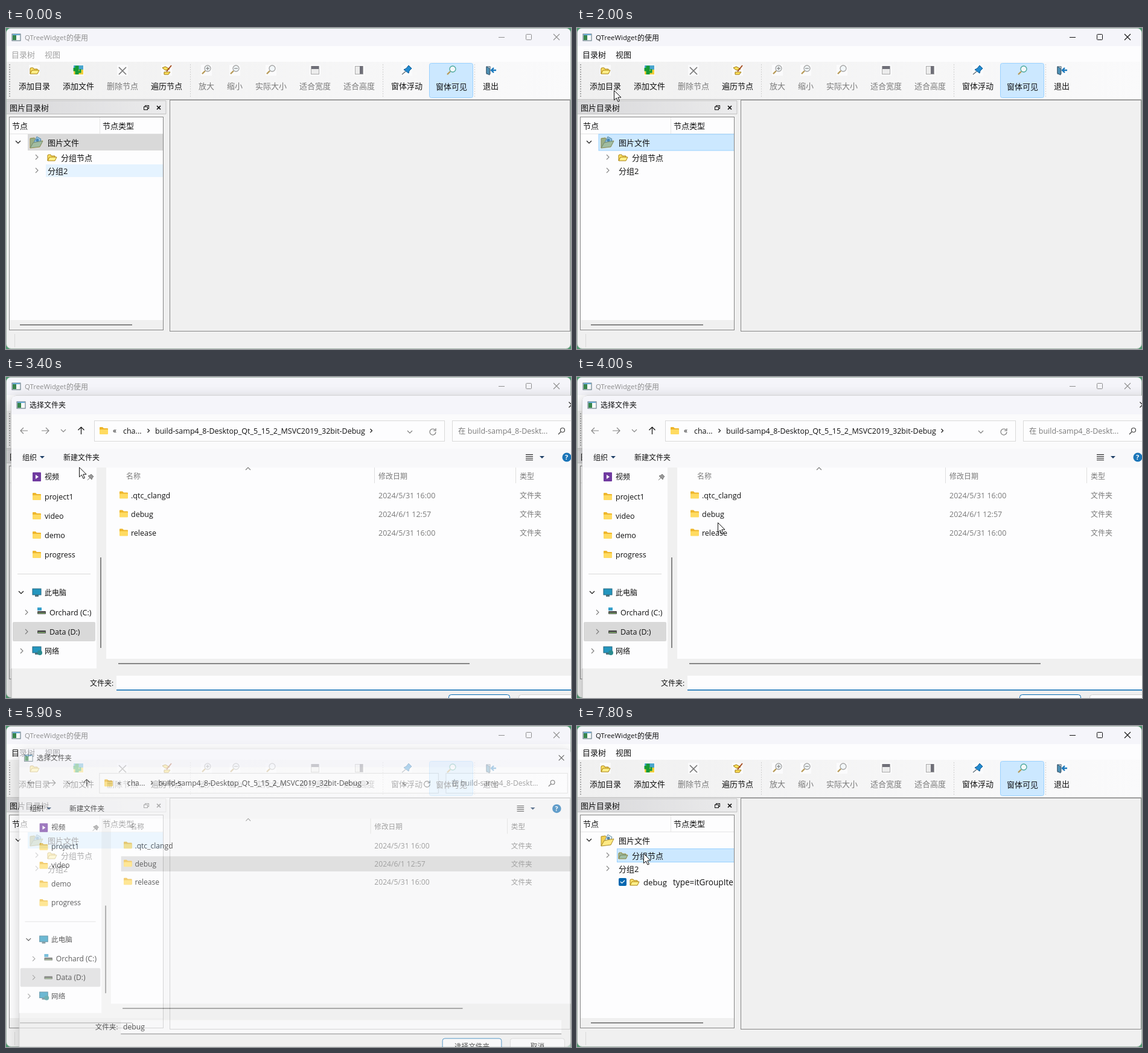
Write an HTML page that moves like this. It is 936 px wide and 532 px high and loops after 8000 ms.

```html
<!DOCTYPE html>
<html lang="zh">
<head>
<meta charset="utf-8">
<style>
html, body { margin: 0; width: 936px; height: 532px; overflow: hidden; background: #4f9a70; }
svg { display: block; font-family: "Open Sans", "Noto Sans CJK SC", "Noto Sans CJK", sans-serif; }
text { white-space: pre; }
</style>
</head>
<body>
<svg id="stage" width="936" height="532" viewBox="0 0 936 532"></svg>
<script>
const PAPER = '#f0f0f0', WHITE = '#fdfdfe', GREY = '#d9d9d9', BLUE = '#cce8ff', HOVER = '#e5f3ff', RIM = '#99d1ff';
const LINE = '#868686', DIM = '#7a7a7a', INK = '#111', ACCENT = '#0067b0';

const R = (x, y, w, h, fill, more = '') => `<rect x="${x}" y="${y}" width="${w}" height="${h}" fill="${fill}" ${more}/>`;
const P = (d, stroke = INK, w = 1, fill = 'none', more = '') => `<path d="${d}" stroke="${stroke}" stroke-width="${w}" fill="${fill}" ${more}/>`;
const C = (x, y, r, fill, stroke = 'none', w = 1) => `<circle cx="${x}" cy="${y}" r="${r}" fill="${fill}" stroke="${stroke}" stroke-width="${w}"/>`;
// Text centred vertically on y
const T = (x, y, s, fill = INK, size = 13, more = '') =>
  `<text x="${x}" y="${y + size * .38}" font-size="${size}" fill="${fill}" ${more}>${s}</text>`;
const D = (x, y, s, fill) => T(x, y, s, fill, /[a-z0-9]/i.test(s) ? 12.5 : 12);
const G = (id, body, more = '') => `<g id="${id}" ${more}>${body}</g>`;
const at = (x, y, body) => `<g transform="translate(${x} ${y})">${body}</g>`;
const line = s => `stroke="${s}"`;

const chevron = (x, y, dir, c = INK, r = 4) => at(x, y, P(
  dir == 'right' ? `M${-r / 2} ${-r}L${r / 2} 0L${-r / 2} ${r}` :
  dir == 'up' ? `M${-r} 2L0 -2L${r} 2` : `M${-r} -2L0 2L${r} -2`, c, 1.1));
const cross = (x, y, r, c = INK, w = 1.1) => P(`M${x - r} ${y - r}l${2 * r} ${2 * r}m0 ${-2 * r}l${-2 * r} ${2 * r}`, c, w);
const appIcon = (x, y) => R(x, y, 14, 11, '#f7f9f9', line('#536c79')) + R(x + 1, y + 2, 6, 8, '#37854d') + R(x + 1, y, 12, 2, '#69a9d4');

// Open folder used by the main window
const FLAT = 'M-7 5V-4L-6 -5H-2L-1 -3H5V-1H8L5 5Z';
const openFolder = (x, y) => at(x, y,
  P('M-7 5V-4L-6 -5H-2L-1 -3H5V-1', '#a87f08', 1, '#ffe36a') +
  P('M-7 5L-4 -1H8L5 5Z', '#a87f08', 1, '#fff08a'));
const folder = (x, y) => at(x, y,
  P('M-7 5V-5Q-7 -6 -6 -6H-2L0 -4H6Q7 -4 7 -3V5Z', 'none', 0, '#eeb62c') + R(-7, -2, 14, 8, '#ffdb61', 'rx="1"'));
const lens = (x, y, rim, mark = '') => at(x, y,
  P('M-2 2L-7 7', '#b79a57', 2.4) + C(2, -2, 5, '#f2f7f9', rim, 1.3) + P(mark, '#6f6f6f'));
const BIG = 'M-10 9V-7L-3 -8L-1 -5L1 -10L7 -7L8 -4L11 -2L6 7Z';
const bigFolder = at(50, 190,
  P('M-10 9V-7L-3 -8L-1 -5H7V0', '#a98b27', 1, '#f3d052') + P('M-4 0L1 -10L8 -6L5 2Z', '#668ba0', 1, '#e3f0f6') + C(2, -4, 2.5, '#5584a8') +
  P('M-10 9L-5 0L11 -3L6 7Z', '#a98b27', 1, '#ffe983'));

const icons = {
  folder: x => openFolder(x, 71),
  picture: x => R(x - 8, 62, 16, 15, '#f3cf3c') + R(x - 8, 62, 16, 7, '#4aa5cf') +
    P(`M${x - 4} 77V70h-3v-4m3 4V64h3v13m0 -4h4v-5`, '#159a35', 3),
  remove: x => cross(x, 71, 6, '#777', 1.7),
  walk: x => at(x, 70, P('M-7 -4L-2 -6L5 -2L-2 0Z', '#9c760b', 1, '#ffe15c') + P('M-4 3H6L3 7H-4Z', '#9c760b', 1, '#ffe15c') + P('M8 -8L0 2', '#a34b1e', 2)),
  plus: x => lens(x, 69, '#a3a3a3', 'M-1 -2H5M2 -5V1'),
  minus: x => lens(x, 69, '#a3a3a3', 'M-1 -2H5'),
  real: x => lens(x, 69, '#a3a3a3'),
  wide: x => R(x - 6.5, 63.5, 13, 13, '#ececec', line('#aaa')) + R(x - 6, 63, 12, 5, '#6f6f78'),
  tall: x => R(x - 6.5, 63.5, 13, 13, '#ececec', line('#aaa')) + R(x + 1, 63, 5, 13, '#6f6f78'),
  pin: x => at(x, 70, P('M-2 2L-8 7', '#62717b', 1.4) + P('M-5 -1L3 5L4 1L8 -3L3 -8L-1 -3Z', '#0b558e', 1, '#238bd0')),
  find: x => lens(x, 70, '#4aa79a'),
  exit: x => at(x, 70, R(-7, -6, 6, 12, '#e7eff1', line('#35546b')) + P('M-7 -6L-2 -3V8L-7 5Z', '#35546b', 1, '#4f93b8') +
    P('M9 0H2M5 -4L1 0L5 4', '#1b79bd', 2.4))
};
const tools = [
  [21, '添加目录', 'folder'], [94, '添加文件', 'picture'], [167, '删除节点', 'remove', 1], [240, '遍历节点', 'walk'],
  [319, '放大', 'plus', 1], [366, '缩小', 'minus', 1], [413, '实际大小', 'real', 1], [486, '适合宽度', 'wide', 1],
  [559, '适合高度', 'tall', 1], [638, '窗体浮动', 'pin'], [712, '窗体可见', 'find'], [790, '退出', 'exit']
];
const toolbar = R(1, 56, 934, 62, 'url(#bar)') +
  R(701.5, 58.5, 72, 57, BLUE, `rx="3" stroke="${RIM}"`) +
  [6, 305.5, 624.5, 776.5].map((x, i) => P(`M${x} 60V115`, i ? '#d0d0d0' : '#a9a9a9', i ? 1 : 2, 'none', 'stroke-dasharray="2 2"')).join('') +
  tools.map(([x, s, icon, off]) => {
    const mid = x + s.length * 6.5, y = icon == 'find' ? 97 : 96;
    return R(mid - 9, 61, 18, 18, WHITE, `opacity="${icon == 'find' ? 0 : .8}"`) + icons[icon](mid) + T(x, y, s, off ? DIM : INK);
  }).join('');

const tree = R(1, 121, 264, 22, 'url(#dock)') + P('M1 120.5H265V142.5H1', '#c3c3c3') + T(6, 132, '图片目录树') +
  R(230.5, 128.5, 6, 5, 'none', line(INK)) + R(228.5, 130.5, 6, 5, '#e3e3e3', line(INK)) + cross(253, 132, 3, INK, 1.7) +
  R(5.5, 147.5, 255, 353, WHITE, line(LINE)) + P('M155.5 148V175M6 175.5H260', '#e5e5e5') +
  T(10, 162, '节点') + T(160, 162, '节点类型') +
  R(6, 484, 254, 16, PAPER) + P('M23 492H209', LINE, 2) +
  `<g clip-path="url(#cell)">` +
  R(36, 176, 225, 27, BLUE, 'id="rootRow"') + R(66.5, 203.5, 194, 22, BLUE, 'id="nodeRow"') +
  R(66, 226, 195, 21, HOVER, 'id="groupRow"') +
  chevron(20, 189, 'down') + chevron(51, 214, 'right', LINE) + chevron(51, 236, 'right', LINE) +
  bigFolder + at(50, 190, P(BIG, 'none', 0, '#2f86c4', 'id="rootTint" opacity=".45"')) + T(69, 190, '图片文件') +
  openFolder(76, 215) + at(76, 215, P(FLAT, 'none', 0, '#2f86c4', 'id="nodeTint" opacity=".45"')) + T(91, 215, '分组节点') +
  T(69, 237, '分组2') +
  G('added', R(69, 252, 13, 13, ACCENT, 'rx="2"') + P('M72 258l2.5 2.5L79 256', '#fff', 1.2) + openFolder(95, 259) +
    T(110, 259, 'debug', INK, 13.2) + T(159, 259, 'type=itGroupItem', INK, 13.6)) + `</g>`;

const mainWindow = R(.5, .5, 935, 531, PAPER, 'rx="8" stroke="#a3b5aa"') +
  P('M1 30V8Q1 1 8 1H928Q935 1 935 8V30Z', 'none', 0, '#f5f5fa') + appIcon(10, 10) +
  G('caption', T(31, 16, 'QTreeWidget', 'currentColor', 11.4) + T(100, 16, '的使用', 'currentColor', 12) +
    P('M816 15.5H826', 'currentColor') + R(861.5, 10.5, 9, 9, 'none', 'rx="1" stroke="currentColor"') + cross(912, 15, 5, 'currentColor')) +
  R(1, 30, 934, 26, WHITE) + G('menu', T(9, 44, '目录树', 'currentColor') + T(64, 44, '视图', 'currentColor')) +
  toolbar + P('M1 118.5H935', '#b4b4b4') + tree +
  R(271.5, 119.5, 663, 383, PAPER, line(LINE)) + P('M14.5 507V529', '#d9d9d9');

const places = ['project1', 'video', 'demo', 'progress'].map((s, i) => folder(51, 198 + 32 * i) + D(64, 198 + 32 * i, s)).join('');
const files = [['.qtc_clangd', '2024/5/31 16:00'], ['debug', '2024/6/1 12:57'], ['release', '2024/5/31 16:00']]
  .map(([s, date], i) => {
    const y = 196.5 + 31 * i;
    return folder(195, y - 1) + D(207, y, s) + D(617, y, date, DIM) + D(851, y, '文件夹', DIM);
  }).join('');
const drive = y => R(52, y - 2, 14, 5, '#4e4e4e', 'rx="1"') + R(53, y + 1, 12, 1, '#8fca72');
const screen = y => R(44, y - 6, 14, 10, '#2496be', 'stroke="#226780"') + R(48, y + 4, 6, 3, '#51727c');

const frame = R(9, 31, 944, 537, PAPER, 'rx="8" stroke="#b8b8b8" filter="url(#shadow)"') +
  P('M9 62V39Q9 31 17 31H945Q953 31 953 39V62Z', 'none', 0, '#f5f5fa') + R(9, 62, 944, 57, '#fbfbfc') + R(9, 119, 944, 31, '#f8f8fa') +
  appIcon(18, 41) + D(39, 46, '选择文件夹') + cross(937, 46, 4.5) +
  R(9, 150, 141, 333, WHITE) + R(166, 150, 787, 317, WHITE) + P('M186 475H768', LINE, 2) +
  R(183, 495, 754, 24, WHITE) + R(183, 518, 754, 1.5, LINE, 'id="underline"') +
  R(733.5, 526.5, 101, 27, WHITE, `rx="4" stroke="${ACCENT}"`) + R(849.5, 526.5, 93, 27, WHITE, 'rx="4" stroke="#d0d0d0"');

const content =
  P('M36 89H24m5 -5l-5 5l5 5M59 89H71m-5 -5l5 5l-5 5', LINE, 1.2) + chevron(95, 89, 'down', LINE) + P('M124.5 95V83m-5 5l5 -5l5 5', INK, 1.2) +
  R(146.5, 72.5, 580, 34, WHITE, line('#d9d9d9')) + folder(162, 89) + D(177, 88, '«') + D(194, 89, 'cha...') + chevron(236, 89, 'right', INK, 3) +
  D(247, 89, 'build-samp4_8-Desktop_Qt_5_15_2_MSVC2019_32bit-Debug') + chevron(605, 89, 'right', INK, 3) +
  chevron(669, 91, 'down', DIM) + P('M711 88A5 5 0 1 0 712 91M712 85V89H708', DIM, 1.2) +
  R(739.5, 72.5, 208, 34, WHITE, line('#d9d9d9')) + D(749, 89, '在 build-samp4_8-Deskt...', DIM) + C(922, 88, 3.5, 'none', '#444', 1.2) + P('M919 91l-4 4', '#444', 1.3) +
  D(27, 133, '组织') + P('M56 131h8l-4 4Z', 'none', 0, '#1e3f66') + D(95, 133, '新建文件夹') +
  P('M861 128.5H873M861 131.5H873M861 134.5H873M861 137.5H873') + P('M884 131h8l-4 4Z', 'none', 0, '#1e3f66') +
  C(929, 133, 7.5, '#1b75b8') + T(926, 133, '?', '#fff', 11, 'font-weight="bold"') +
  R(44, 158, 14, 15, '#703aa0', 'rx="1"') + P('M49 162v7l5 -3.5Z', 'none', 0, '#fff') + D(64, 165, '视频') +
  P('M135 171l4 -4m-3 -3l6 6l1 -3l2 -2l-4 -4l-2 2Z', '#777', 1, '#999') + places + P('M19 326.5H140', '#d9d9d9') +
  chevron(25, 357, 'down') + screen(357) + D(64, 357, '此电脑') +
  chevron(34, 390, 'right', DIM) + drive(390) + R(52, 382, 7, 5, '#39a1cb') + D(72, 390, 'Orchard (C:)') +
  R(11, 406, 137, 32, GREY, 'rx="2"') + chevron(34, 422, 'right', DIM) + drive(422) + D(72, 422, 'Data (D:)') +
  chevron(26, 454, 'right', DIM) + screen(453) + C(56, 457, 4, '#2b8b8e') + D(64, 454, '网络') +
  P('M157 299V449', LINE, 2) +
  D(199, 164, '名称', DIM) + chevron(401, 152, 'up', DIM) + D(617, 164, '修改日期', DIM) + D(851, 164, '类型', DIM) +
  P('M610.5 150V176M844.5 150V176', '#dedede') +
  R(183.5, 214.5, 769, 26, BLUE, 'id="fileRow"') + files +
  D(139, 507, '文件夹:') + G('typed', D(187, 506, 'debug')) + D(754, 540, '选择文件夹') + D(884, 540, '取消');

const stage = document.getElementById('stage');
stage.innerHTML = `<defs>
  <linearGradient id="bar"><stop stop-color="#f0f0f0"/><stop offset="1" stop-color="#fafafb"/></linearGradient>
  <linearGradient id="dock"><stop stop-color="#d8d8da"/><stop offset="1" stop-color="#ebebec"/></linearGradient>
  <filter id="shadow" x="-10%" y="-10%" width="120%" height="120%"><feDropShadow dx="0" dy="6" stdDeviation="11" flood-color="#000" flood-opacity=".28"/></filter>
  <clipPath id="cell"><path d="M6 148H260V484H6Z"/></clipPath></defs>` +
  mainWindow + G('dialog', frame + G('content', content)) +
  G('cursor', P('M.5 .5V16.5L4.3 13L7 19L9.4 18L6.8 12H12Z', INK, 1, '#fff'));

const el = Object.fromEntries([...stage.querySelectorAll('[id]')].map(e => [e.id, e]));
const set = (id, attrs) => { for (const k in attrs) el[id].setAttribute(k, attrs[k]); };
const show = (id, on) => set(id, { display: on ? 'inline' : 'none' });
const clamp = v => Math.max(0, Math.min(1, v));

const path = [
  [600, 131, 229], [700, 131, 229], [900, 97, 185], [1200, 97, 185], [2000, 61, 103], [2100, 58, 99], [2300, 49, 87],
  [3100, 49, 87], [3500, 145, 170], [3800, 233, 241], [4000, 233, 241], [4200, 236, 227], [4500, 236, 227],
  [5200, 780, 540], [5900, 780, 540], [6300, 319, 345], [6600, 319, 345], [7500, 118, 216], [7700, 110, 211], [8000, 110, 211]
];
function cursorAt(t) {
  const i = Math.max(1, path.findIndex(p => p[0] >= t));
  const [a, ax, ay] = path[i - 1], [b, bx, by] = path[i], u = clamp((t - a) / (b - a));
  return [ax + (bx - ax) * u, ay + (by - ay) * u];
}

function draw(t) {
  const [x, y] = cursorAt(t);
  set('cursor', { transform: `translate(${x} ${y})` });
  show('cursor', t >= 700);

  const active = t >= 1300 && t < 3000 || t >= 6000, picked = t >= 7700;
  set('caption', { color: active ? INK : '#8f8f8f' });
  set('menu', { color: t < 1300 ? '#a3a3a3' : INK });

  const over = (top, bottom) => t > 6500 && x < 260 && y >= top && y < bottom;
  set('rootRow', { fill: t < 1300 ? GREY : BLUE, stroke: t >= 1300 && t < 3000 || over(176, 203) ? RIM : 'none' });
  show('rootRow', !picked);
  show('rootTint', !picked);
  show('groupRow', t < 1300 || over(226, 247));
  show('nodeRow', over(203, 226));
  set('nodeRow', { fill: picked ? BLUE : HOVER, stroke: picked ? RIM : 'none' });
  show('nodeTint', picked);
  show('added', t >= 6100);

  const closing = clamp((t - 5800) / 300);
  const shrink = closing ? closing * .8 : (1 - clamp((t - 3100) / 300)) ** 2;
  set('dialog', {
    opacity: clamp((t - 3040) / 250) * (1 - closing),
    transform: `translate(${9 + 48 * shrink} ${31 + 27 * shrink}) scale(${1 - .12 * shrink}) translate(-9 -31)`
  });
  // The frame appears before its contents are painted
  show('content', t >= 3200);
  const chosen = t >= 4200, focused = t < 5500;
  show('fileRow', t >= 4100);
  set('fileRow', { fill: !focused ? GREY : chosen ? BLUE : HOVER, stroke: chosen && focused ? RIM : 'none' });
  show('typed', chosen);
  set('underline', { fill: chosen ? LINE : ACCENT });
}

const start = performance.now();
function tick() {
  draw(Math.floor((performance.now() - start) % 8000 / 100) * 100);
  requestAnimationFrame(tick);
}
tick();
</script>
</body>
</html>
```
